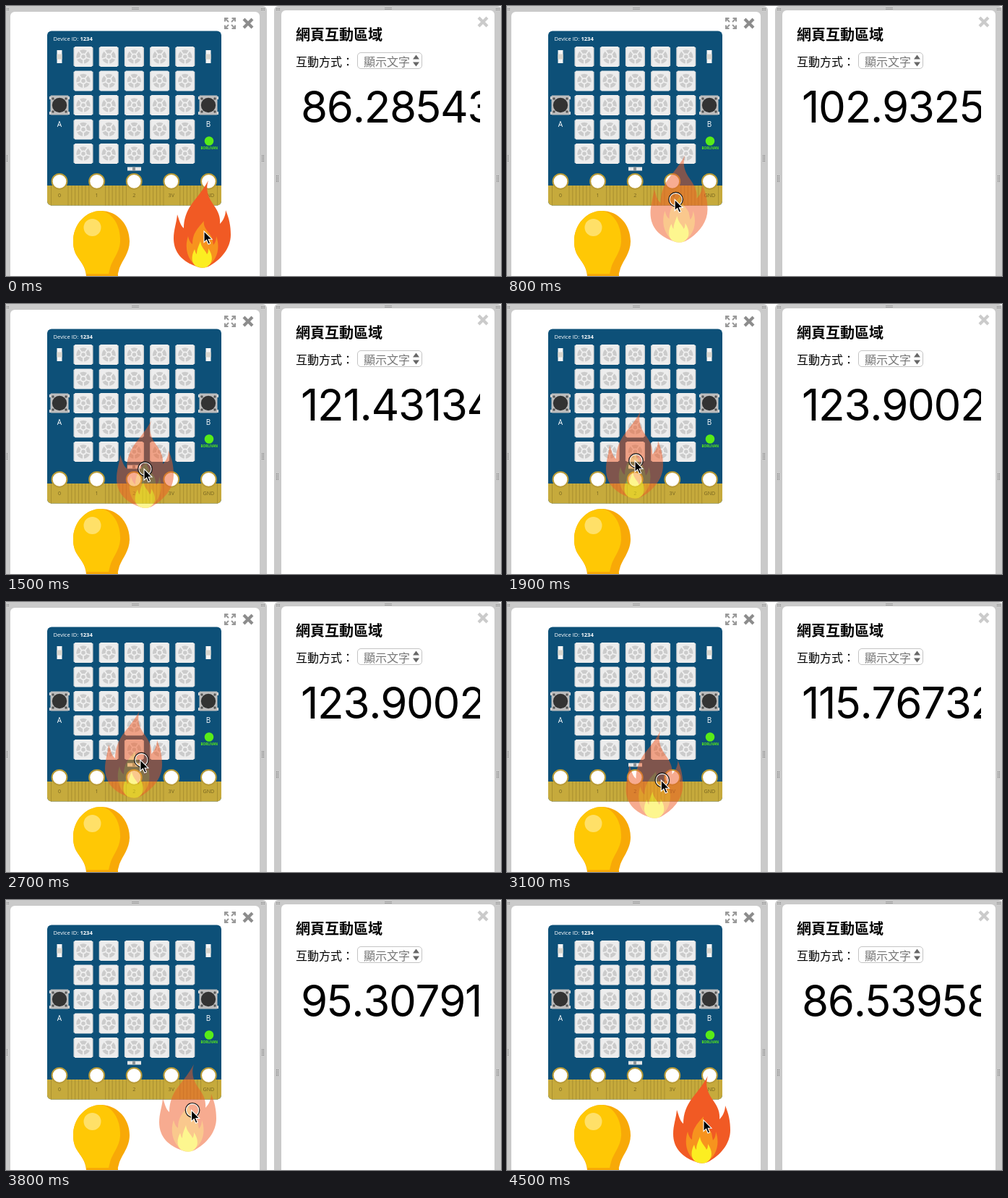
An HTML page that plays this animation: 685x373 px, repeating every 4700 ms.

```html
<!DOCTYPE html>
<html lang="zh-Hant">
<head>
<meta charset="utf-8">
<style>
  html, body { margin: 0; width: 100%; height: 100%; overflow: hidden; background: #fff; }
  svg { display: block; }
  text { font-family: "Open Sans", "Noto Sans", sans-serif; }
  .cjk { font-family: "Noto Sans CJK TC", "Noto Sans CJK JP", "Noto Sans CJK", sans-serif; }
  #value {
    font: 60px Inter, "Liberation Sans", sans-serif;
    font-kerning: none;
    letter-spacing: -1.3px;
  }
</style>
</head>
<body>
<svg id="stage" width="685" height="373" viewBox="0 0 685 373"></svg>
<script>
const rect = (x, y, w, h, fill, r = 0) =>
  `<rect x="${x}" y="${y}" width="${w}" height="${h}" rx="${r}" fill="${fill}"/>`;
const circle = (x, y, r, fill, extra = "") =>
  `<circle cx="${x}" cy="${y}" r="${r}" fill="${fill}" ${extra}/>`;
const path = (d, fill, extra = "") => `<path d="${d}" fill="${fill}" ${extra}/>`;
const line = (d, color, width) => path(d, "none", `stroke="${color}" stroke-width="${width}"`);
const label = (x, y, size, fill, str, extra = "") =>
  `<text x="${x}" y="${y}" font-size="${size}" fill="${fill}" ${extra}>${str}</text>`;
const cjk = (x, y, size, fill, str, weight = 400) =>
  label(x, y, size, fill, str, `class="cjk" font-weight="${weight}"`);
const group = (content, attrs) => `<g ${attrs}>${content}</g>`;
const repeat = (n, make) => Array.from({ length: n }, (_, i) => make(i)).join("");
const middle = 'text-anchor="middle"';

// Dotted resize handle
const grip = (x, y, cols, rows) => repeat(cols * rows, i =>
  rect(x + i % cols * 2, y + Math.floor(i / cols) * 2, 1, 1, "#777"));

const panel = (x, w, top, sideY) =>
  rect(x, 0, w, 390, "#cacaca", 6) +
  rect(x + 10, top, w - 20, 390, "#fff", 6) +
  grip(x + w / 2 - 4, 2, 5, 2) + grip(x + 3, sideY, 2, 5) + grip(x + w - 7, sideY, 2, 5) +
  grip(x + 3, 3, 3, 2) + grip(x + w - 8, 3, 3, 2);

const cross = (x, y, color) =>
  line(`M${x - 6} ${y - 6}l12 12m0-12l-12 12`, color, 4.2);

// One arrow per corner, turned around the centre
const expand = group(repeat(4, i =>
  group(line("M-7-2.500V-7H-2.500M-6.500-6.500L-2-2", "#999", 2), `transform="rotate(${i * 90})"`)),
  'transform="translate(310 24)"');

function led(x, y) {
  const spokes = repeat(5, i =>
    group(line("M0-4V-10", "#f0f0f0", 1.8), `transform="rotate(${i * 72 + 36})"`));
  return group(
    rect(-13.5, -13, 27, 26, "#dcdcdc", 1) + rect(-12, -14, 24, 28, "#ededed", 1) +
    circle(0, 0, 9.7, "#cbcbcb") + spokes +
    circle(0, 0, 4.6, "#f0f0f0") + circle(0, 0, 2.8, "#cbcbcb"),
    `transform="translate(${x} ${y})"`);
}

const button = (x, name) =>
  rect(x - 14, 125, 28, 4, "#ddd") + rect(x - 14, 146, 28, 4, "#ddd") +
  rect(x - 12.5, 123.5, 25, 27, "#bdbdbd", 1) +
  repeat(4, i => circle(x + (i % 2 ? 9 : -9), i < 2 ? 128 : 146, 1.7, "#555")) +
  circle(x, 137, 10.2, "#333") +
  label(x, 167, 10, "#fff", name, middle);

const resistor = x =>
  rect(x - 3.5, 61, 7, 18, "#f4f4f4") + rect(x - 3.5, 66.5, 7, 7, "#d9d6cd");

function board() {
  const pinX = i => 74 + i * 51.6;
  const pins = ["0", "1", "2", "3V", "GND"].map((name, i) =>
    circle(pinX(i), 242.3, 10.4, "#fff", 'stroke="#b99b37" stroke-width="2"') +
    label(pinX(i), 263.5, 7.2, "#766421", name, middle)).join("");
  return rect(57, 34.5, 241, 241, "#0d5078", 6) +
    path("M57 248H298V269.500a6 6 0 0 1-6 6H63a6 6 0 0 1-6-6Z", "#c6aa3c") +
    repeat(4, g => repeat(7, i => rect(pinX(g) + 11.5 + i * 4.8, 248, 1, 27.5, "#aa9030"))) +
    rect(62, 248, 1, 27.5, "#aa9030") + rect(292, 248, 1, 27.5, "#aa9030") + pins +
    repeat(25, i => led(107 + i % 5 * 35.2, 70 + Math.floor(i / 5) * 33.5)) +
    button(74, "A") + button(280, "B") + resistor(74) + resistor(280) +
    rect(168, 222.5, 19, 5, "#e6e6e6") + rect(175, 222.5, 4, 5, "#8b9499") +
    label(65.5, 48, 7.6, "#fff", 'Device ID: <tspan font-weight="700">1234</tspan>') +
    circle(281, 186.5, 6.3, "#58ec18") +
    label(281.3, 198, 4.6, "#58ec18", "BORLIVAN", middle + ' font-weight="700"');
}

const bulb =
  path("M131.5 283C154 283 171 302 171 325C171 341 161 351 157 362L154 373H111C110 360 103 353 98 345C94 338 93 332 93 325C93 302 110 283 131.500 283Z", "#f8a907") +
  path("M131.5 283C147 285 159 303 158 326C157 341 147 350 144 362L142 370H111C110 360 103 353 98 345C94 338 93 332 93 325C93 302 110 283 131.500 283Z", "#ffc805") +
  rect(111, 370.5, 44, 3, "#f8a907") +
  circle(119.5, 306, 12, "#ffe068");

const flame =
  path("M280 241C276 253 279 263 286 273C293 283 297 290 296 301C301 296 304 289 304 282C309 294 311 304 311 316C311 335 297 351 280 360Q271 363 264 360C246 354 232 342 232 321C232 309 236 300 237 288C240 296 241 303 246 307C246 291 252 279 262 267C270 257 275 250 280 241Z", "#f15a24") +
  path("M274 297C272 306 281 312 285 320C286 324 286 326 287 330C290 327 291 322 291 318C297 335 292 352 278 360L264 360C250 350 247 333 252 318C253 323 255 327 258 329C258 315 264 308 274 297Z", "#f7931e") +
  path("M269 325C270 334 276 337 278 343C280 341 280 338 280 335C287 345 287 356 277 361Q271 363 264 360C256 356 256 345 261 336C262 339 262 341 264 343C264 336 267 331 269 325Z", "#fcee21");

const pointer =
  group(circle(1.5, 0, 8.8, "none", 'stroke="#fff" stroke-width="1.4"') +
    circle(1.5, 0, 9.8, "none", 'stroke="#111" stroke-width="1.2"'), 'id="ring"') +
  path("M0 0V15.500L3.600 12.200L6 18L8.600 16.900L6.200 11.200H11Z", "#000",
    'stroke="#fff" stroke-width="1.1"');

document.getElementById("stage").innerHTML =
  '<clipPath id="clip"><rect x="400" y="100" width="256" height="90"/></clipPath>' +
  panel(-4, 365, 8, 206) + panel(371, 315, 6, 234) +
  expand + cross(335, 24, "#8c8c8c") + cross(660, 22, "#cbcbcb") +
  cjk(401, 47, 20, "#000", "網頁互動區域", 700) +
  cjk(401, 83, 16, "#000", "互動方式：") +
  '<rect x="486.5" y="64.5" width="89" height="22" rx="4.5" fill="#fff" stroke="#c4c4c4"/>' +
  cjk(495, 83, 16, "#777", "顯示文字") +
  path("M563 73.500l4.500-6l4.500 6ZM563 77.500l4.500 6l4.500-6Z", "#666") +
  group('<text id="value" x="408" y="161"></text>', 'clip-path="url(#clip)"') +
  board() + bulb + group(flame, 'id="flame"') + group(pointer, 'id="pointer"');

const [flameEl, pointerEl, ringEl, valueEl] =
  ["flame", "pointer", "ring", "value"].map(id => document.getElementById(id));

const LOOP = 4700, STEP = 100, GRAB = 500, DROP = 4400, LEAD = 100;

// Drag out and back: time, x, y, reading
const drag = [
  [GRAB - STEP, 0, 0, 86.285432],
  [1200, -67, -70, 119.579663],
  [1900, -95, -93, 123.900248],
  [2300, -103, -99, 125.134721],
  [2700, -95, -91, 123.900248],
  [3400, -47, -42, 109.667634],
  [3800, -20, -14, 95.307914],
  [4500, -2, 2, 86.539582]
];

const clamp = (v, lo, hi) => Math.min(hi, Math.max(lo, v));

function pose(time) {
  const t = clamp(time, drag[0][0], drag[drag.length - 1][0]);
  const i = Math.max(1, drag.findIndex(k => k[0] >= t));
  const a = drag[i - 1], b = drag[i], p = (t - a[0]) / (b[0] - a[0]);
  return a.map((v, j) => v + (b[j] - v) * p);
}

const move = (el, x, y) => el.setAttribute("transform", `translate(${x} ${y})`);

function draw() {
  const t = Math.floor(performance.now() % LOOP / STEP) * STEP;
  const dragging = t >= GRAB && t < DROP;
  const [, x, y, value] = pose(t);
  // The pointer runs ahead of the flame and slips upward on the way back
  const [, px, py] = pose(dragging ? t + LEAD : t);
  const slip = 9 * clamp((t - 1900) / 800, 0, 1);
  move(flameEl, x, y);
  flameEl.setAttribute("opacity", dragging ? 0.5 : 1);
  move(pointerEl, 274 + px, 311 + py - slip);
  ringEl.setAttribute("visibility", dragging ? "visible" : "hidden");
  valueEl.textContent = value.toFixed(6);
  requestAnimationFrame(draw);
}
draw();
</script>
</body>
</html>
```
